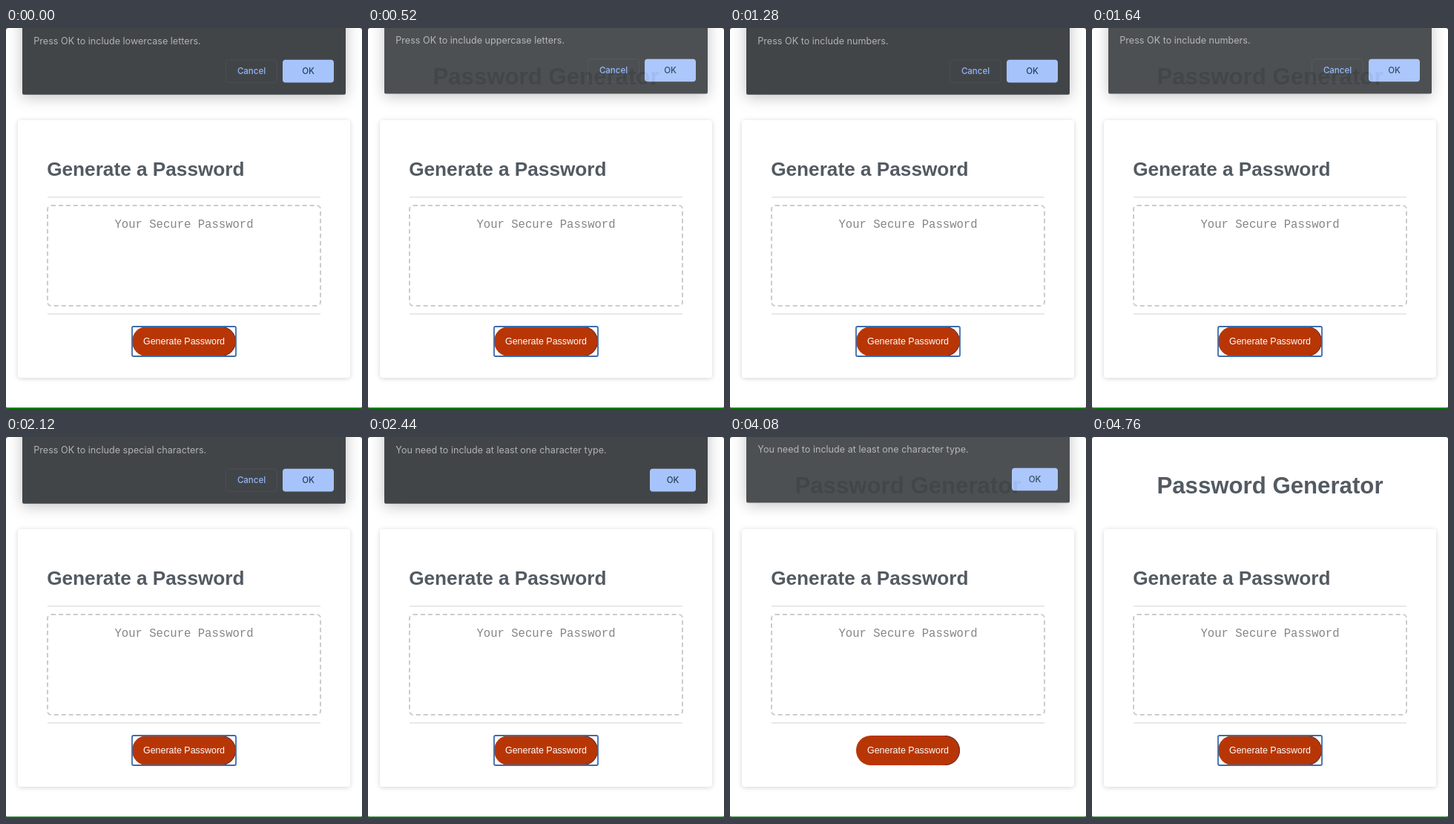
Recreate the animation shown at these times as an HTML page. Size 480 by 513 pixels, loop 4.92 s.

```html
<!DOCTYPE html>
<html lang="en">
<head>
<meta charset="utf-8">
<title>Password Generator</title>
<style>
  html, body { margin: 0; width: 100%; height: 100%; overflow: hidden; background: #fff; }
  svg, #field { position: absolute; left: 0; top: 0; }
  svg { width: 480px; height: 513px; font-family: "Liberation Sans", Arial, sans-serif; }
  #field {
    left: 55px; top: 238px; width: 370px; height: 137px; box-sizing: border-box;
    border: 2px dashed #ccc; border-radius: 6px;
  }
  .title { font-weight: bold; fill: #535a62; }
  .mid { text-anchor: middle; }
  .card { fill: #fff; filter: drop-shadow(0 1px 3px rgba(0, 0, 0, .17)); }
  .sheet { fill: #424548; filter: drop-shadow(0 3px 10px rgba(0, 0, 0, .25)); }
  .dialog { font: 12.6px Inter, sans-serif; }
  .label { font-size: 11.5px; font-weight: 500; text-anchor: middle; }
</style>
</head>
<body>
<svg viewBox="0 0 480 513">
  <rect y="511" width="480" height="2" fill="#128016"/>
  <path d="M0 0h2l-2 2zM480 0h-2l2 2zM0 513v-3l3 3zM480 513v-3l-3 3z" fill="#555"/>
  <text class="title mid" x="240" y="76" font-size="31.2">Password Generator</text>
  <rect class="card" x="16" y="124" width="448" height="347" rx="4"/>
  <text class="title" x="55.2" y="198.5" font-size="26.2">Generate a Password</text>
  <path d="M56 227.8H424M56 385H424" stroke="#e2e2e2" stroke-width="1.5"/>
  <text class="mid" x="240" y="269" font-size="15.6" fill="#858585"
        font-family="Liberation Mono, Courier New, monospace">Your Secure Password</text>
  <rect x="170" y="402" width="140" height="40" rx="20" fill="#b83605"/>
  <path d="M290 402.5a19.5 19.5 0 0 1 0 39" fill="none" stroke="#5a3048"/>
  <text class="mid" x="240" y="426" font-size="12.45" fill="#fff">Generate Password</text>
  <rect id="ring" x="170" y="402" width="140" height="40" rx="2" fill="none" stroke="#3d6ca8" stroke-width="1.8"/>
  <g id="dialogs"></g>
</svg>
<div id="field"></div>
<script>
const LOOP = 4920, STEP = 40, FADE = 160;
const ask = what => `Press OK to include ${what}.`;

// message, time it opens, time it closes
const dialogs = [
  [ask("lowercase letters"), -FADE, 300],
  [ask("uppercase letters"), 400, 960],
  [ask("numbers"), 1060, 1600],
  [ask("special characters"), 1700, 2190],
  ["You need to include at least one character type.", 2280, 4040],
];

const button = (label, x, width, fill, stroke, color) => `
  <rect x="${x}" y="42.8" width="${width}" height="30.6" rx="4" fill="${fill}" stroke="${stroke}"/>
  <text class="label" x="${x + width / 2}" y="62" fill="${color}">${label}</text>`;

const okButton = (x, width) => button("OK", x, width, "#a6c4fb", "none", "#2b3f60");

const layer = document.getElementById("dialogs");
const ring = document.getElementById("ring");

layer.innerHTML = dialogs.map(([message], i) => `
  <g class="dialog">
    <rect class="sheet" x="22" y="-60" width="436" height="149.7" rx="2"/>
    <text x="37.3" y="22" fill="#b0b2b4">${message}</text>
    ${i < 4
      ? button("Cancel", 296.5, 69, "none", "#4a4e54", "#92b7f7") + okButton(373, 69)
      : okButton(380, 62)}
  </g>`).join("");

const clamp = v => Math.min(1, Math.max(0, v));

function draw(t) {
  dialogs.forEach(([, opens, closes], i) => {
    const rise = 1 - (1 - clamp((t - opens) / FADE)) ** 2;
    const fall = clamp((t - closes) / FADE) ** 2;
    const alpha = rise * (1 - fall);
    const node = layer.children[i];
    node.setAttribute("opacity", alpha);
    node.setAttribute("transform", `translate(0 ${-18 * (1 - alpha)})`);
  });
  ring.setAttribute("opacity", t >= 4040 && t < 4600 ? 0 : 1);
}

const start = performance.now();
function tick() {
  const t = (performance.now() - start) % LOOP;
  draw(Math.floor(t / STEP) * STEP);
  requestAnimationFrame(tick);
}
tick();
</script>
</body>
</html>
```
